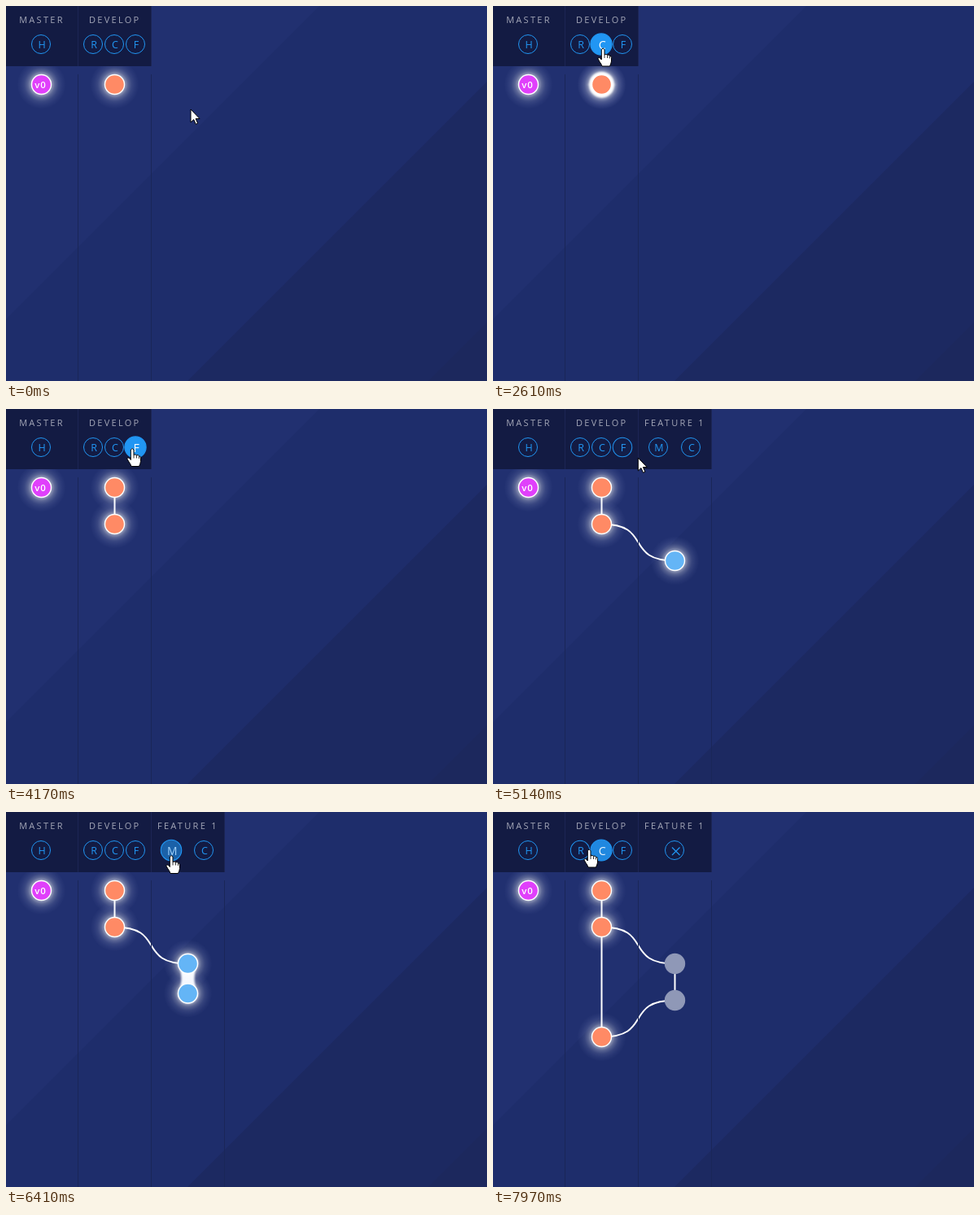
These frames come from a looping animation (591x461 px, 7.99 s). An HTML page:

```html
<!DOCTYPE html>
<html lang="en">
<head>
<meta charset="utf-8">
<title>Branch flow</title>
<style>
  html, body { margin: 0; width: 100%; height: 100%; overflow: hidden; background: #1e2d6b; }
  svg { display: block; width: 591px; height: 461px; }
  text { font-family: "Open Sans", "Noto Sans", sans-serif; }
  .label { font-size: 11px; letter-spacing: 2.3px; fill: #a3a6b7; text-anchor: middle; }
  .letter { font-size: 12.5px; text-anchor: middle; fill: currentColor; }
  .cross { stroke: currentColor; stroke-width: 1.2; }
  .tag { font-size: 11.5px; font-weight: 600; letter-spacing: .9px; fill: #fff; }
  .wire { fill: none; stroke: #fff; stroke-width: 2; }
</style>
</head>
<body>
<svg viewBox="0 0 591 461">
  <defs>
    <radialGradient id="glow">
      <stop offset=".42" stop-color="#fff" stop-opacity=".5"/>
      <stop offset=".55" stop-color="#fff" stop-opacity=".26"/>
      <stop offset=".7" stop-color="#e8ecff" stop-opacity=".12"/>
      <stop offset=".86" stop-color="#c8d0ff" stop-opacity=".05"/>
      <stop offset="1" stop-color="#c8d0ff" stop-opacity="0"/>
    </radialGradient>
    <filter id="soft" x="-50%" y="-50%" width="200%" height="200%"><feGaussianBlur stdDeviation="1.2"/></filter>
  </defs>
  <rect width="591" height="461" fill="#213070"/>
  <path d="M385 0H591V461H0V385Z" fill="#1e2d6b"/>
  <path d="M591 93V461H223Z" fill="#1c2961"/>
  <path d="M591 389V461H519Z" fill="#1c285d"/>
  <g id="wires"></g>
  <g id="rules"></g>
  <g id="goos" filter="url(#soft)"></g>
  <g id="dots"></g>
  <g id="heads"></g>
  <g id="cursor" fill="#fff" stroke="#000" stroke-linejoin="round">
    <path id="arrow" d="M0 0V16L3.7 12.6L6.2 18.3L8.6 17.2L6.1 11.6H11Z"/>
    <g id="hand">
      <path d="M-1.7 1.5Q.2 -1.4 2 1.5V8Q4 6.5 5.5 8.3Q7.3 7.3 8.4 9.3Q10.5 9 10.5 11.5V16Q10 19 8.5 22H-1Q-2 19 -4 16.5L-6 13Q-6 10.4 -3.5 12L-1.7 14Z"/>
      <path d="M2 8V12M5.5 8.5V12M8.4 9.5V12.5" stroke-width=".8"/>
    </g>
  </g>
</svg>
<script>
const LOOP = 7990, SLIDE = 700, FADE = 200;
const BRANCH_AT = 4280, MERGE_AT = 7180;
const COL = 90, ROW = 45, BUTTON_Y = 47;
const BLUE = [33, 150, 243], WHITE = [255, 255, 255], GREY = [143, 152, 183];

const $ = id => document.getElementById(id);
const clamp = v => Math.max(0, Math.min(1, v));
const mix = (a, b, p) => a + (b - a) * p;
const smooth = p => p * p * (3 - 2 * p);
const mixRgb = (a, b, p) => `rgb(${a.map((v, i) => Math.round(mix(v, b[i], p)))})`;
const show = (el, on) => { el.style.display = on ? "" : "none"; };

function set(el, attrs) {
  for (const k in attrs) el.setAttribute(k, attrs[k]);
}
function add(parent, tag, attrs, text) {
  const el = document.createElementNS("http://www.w3.org/2000/svg", tag);
  set(el, attrs);
  if (text) el.textContent = text;
  parent.appendChild(el);
  return el;
}

// cubic-bezier(.25, .1, .25, 1), solved by bisection
function ease(x) {
  if (x <= 0 || x >= 1) return clamp(x);
  let lo = 0, hi = 1, s;
  for (let i = 0; i < 20; i++) {
    s = (lo + hi) / 2;
    if (.75 * s * (1 - s) + s * s * s < x) lo = s; else hi = s;
  }
  return .3 * s * (1 - s) * (1 - s) + 3 * s * s * (1 - s) + s * s * s;
}

// Columns
const columns = ["MASTER", "DEVELOP", "FEATURE 1"].map((name, i) => {
  const edge = COL * i + 88;
  const head = add($("heads"), "g", {});
  add(head, "rect", { x: edge - 89, width: COL, height: 74, fill: "#131b43" });
  add(head, "rect", { x: edge, width: 1, height: 74, fill: "#1c2554" });
  add(head, "text", { x: 44 + 89.7 * i, y: 21, class: "label" }, name);
  const rule = add($("rules"), "rect", { x: edge, y: 84, width: 1, height: 377, fill: "#1a2658" });
  return { head, rule };
});

// Buttons, spread evenly around the column centre; "x" is the closed state
const buttons = [];
function addButtons(col, letters, gap, from = 0, to = LOOP) {
  [...letters].forEach((letter, i) => {
    const x = 43 + COL * col + (i - (letters.length - 1) / 2) * gap;
    const g = add(columns[col].head, "g", {});
    const ring = add(g, "circle", { r: 11.5, stroke: "currentColor", fill: "#2196f3" });
    ring.style.color = "#2196f3";
    if (letter === "x") add(g, "path", { d: "M-3 -3.5L6.5 6M6.5 -3.5L-3 6", class: "cross" });
    else add(g, "text", { x: 1, y: 5.2, class: "letter" }, letter);
    buttons.push({ x, g, ring, from, to });
  });
}
addButtons(0, "H", 0);
addButtons(1, "RCF", 26);
addButtons(2, "MC", 40, BRANCH_AT, MERGE_AT);
addButtons(2, "x", 0, MERGE_AT);

// Pointer key points: time, x, y
const track = [
  [0, 227, 127], [860, 227, 127], [1040, 160, 55], [1250, 143, 47.5], [1500, 118, 50],
  [1800, 122, 66], [2160, 135, 52], [3210, 135, 52], [3780, 155, 48.5], [4920, 155, 48.5],
  [4970, 172, 56], [5140, 178, 60], [5310, 226, 62], [5470, 226, 62], [5700, 243, 49],
  [6150, 243, 49], [6310, 215, 53], [6410, 203, 53.5], [7400, 203, 53.5], [7970, 118, 46],
  [LOOP, 118, 46]
];
function pointer(t) {
  const i = Math.max(1, track.findIndex(k => k[0] > t));
  const [t0, x0, y0] = track[i - 1], [t1, x1, y1] = track[i];
  const p = clamp((t - t0) / (t1 - t0));
  return [mix(x0, x1, p), mix(y0, y1, p)];
}
function isOver(b, t) {
  const [x, y] = pointer(t);
  return t >= b.from && t < b.to && Math.abs(x - b.x) < 12 && Math.abs(y - BUTTON_Y) < 12;
}
// Share of the last FADE ms spent over the button
function hover(b, t) {
  const steps = 20;
  let n = 0;
  for (let i = 0; i < steps; i++) n += isOver(b, t - FADE * i / steps);
  return smooth(n / steps);
}

// Commits slide down one row from where they start
const colors = [[224, 64, 251], [255, 138, 101], [100, 181, 246]];
const commit = (col, row, start = -SLIDE) => ({ col, row, start, x: 43.5 + COL * col });
const root = commit(0, 0), base = commit(1, 0), work = commit(1, 1, 2590);
const first = commit(2, 2, BRANCH_AT), second = commit(2, 3, 6055), merge = commit(1, 4, MERGE_AT);
const commits = [merge, second, first, work, base, root];

for (const c of commits) {
  c.g = add($("dots"), "g", {});
  c.halo = add(c.g, "circle", { r: 30, fill: "url(#glow)" });
  c.disc = add(c.g, "circle", { r: 12, "stroke-width": 1.4 });
}
add(root.g, "text", { x: -8.2, y: 4.6, class: "tag" }, "v0");

const links = [[base, work], [work, first], [first, second], [work, merge], [second, merge]]
  .map(([a, b]) => ({
    a, b,
    wire: add($("wires"), "path", { class: "wire" }),
    goo: add($("goos"), "path", { fill: "#f6f9ff" }),
    sticky: a.col === b.col && b.row - a.row === 1
  }));

// White bridge that thins as two commits part
function bridge(a, b) {
  const neck = 1 + 15 * Math.sqrt(1 - b.p);
  const c = Math.max(1, 2 * neck - 11), r = 12 + 3.5 * clamp(1 - b.p * 2);
  const mid = (a.y + b.y) / 2, left = a.x - r, right = a.x + r;
  return `M${left} ${a.y}A${r} ${r} 0 0 1 ${right} ${a.y}Q${a.x + c} ${mid} ${right} ${b.y}` +
    `A${r} ${r} 0 0 1 ${left} ${b.y}Q${a.x - c} ${mid} ${left} ${a.y}Z`;
}
function drawLink({ a, b, wire, goo, sticky }, t) {
  const on = t >= b.start, bend = (b.x - a.x) * .7;
  show(wire, on);
  show(goo, on && sticky);
  set(wire, { d: `M${a.x} ${a.y}C${a.x + bend} ${a.y} ${b.x - bend} ${b.y} ${b.x} ${b.y}` });
  if (sticky) set(goo, { d: bridge(a, b), opacity: clamp((1 - b.p) / .13) });
}

function render(t) {
  show(columns[2].head, t >= BRANCH_AT);
  show(columns[2].rule, t >= BRANCH_AT);

  for (const b of buttons) {
    const h = hover(b, t);
    show(b.g, t >= b.from && t < b.to);
    set(b.g, { transform: `translate(${b.x} ${BUTTON_Y}) scale(${1 + .14 * Math.sqrt(h)})` });
    set(b.ring, { "fill-opacity": h });
    b.g.style.color = mixRgb(BLUE, WHITE, h);
  }

  const gone = clamp((t - MERGE_AT) / 300);
  for (const c of commits) {
    const off = c.col === 2 ? gone : 0;
    c.p = ease((t - c.start) / SLIDE);
    c.y = 96.5 + ROW * (c.row ? c.row - 1 + c.p : 0);
    show(c.g, t >= c.start);
    set(c.g, { transform: `translate(${c.x} ${c.y})` });
    set(c.disc, { fill: mixRgb(colors[c.col], GREY, off), stroke: mixRgb(WHITE, GREY, off) });
    set(c.halo, { opacity: 1 - off });
  }
  links.forEach(l => drawLink(l, t));

  const over = buttons.some(b => isOver(b, t));
  const [x, y] = pointer(t);
  set($("cursor"), { transform: `translate(${x.toFixed(1)} ${y.toFixed(1)})` });
  show($("hand"), over);
  show($("arrow"), !over);
}

const begin = performance.now();
function tick() {
  render((performance.now() - begin) % LOOP);
  requestAnimationFrame(tick);
}
tick();
</script>
</body>
</html>
```
